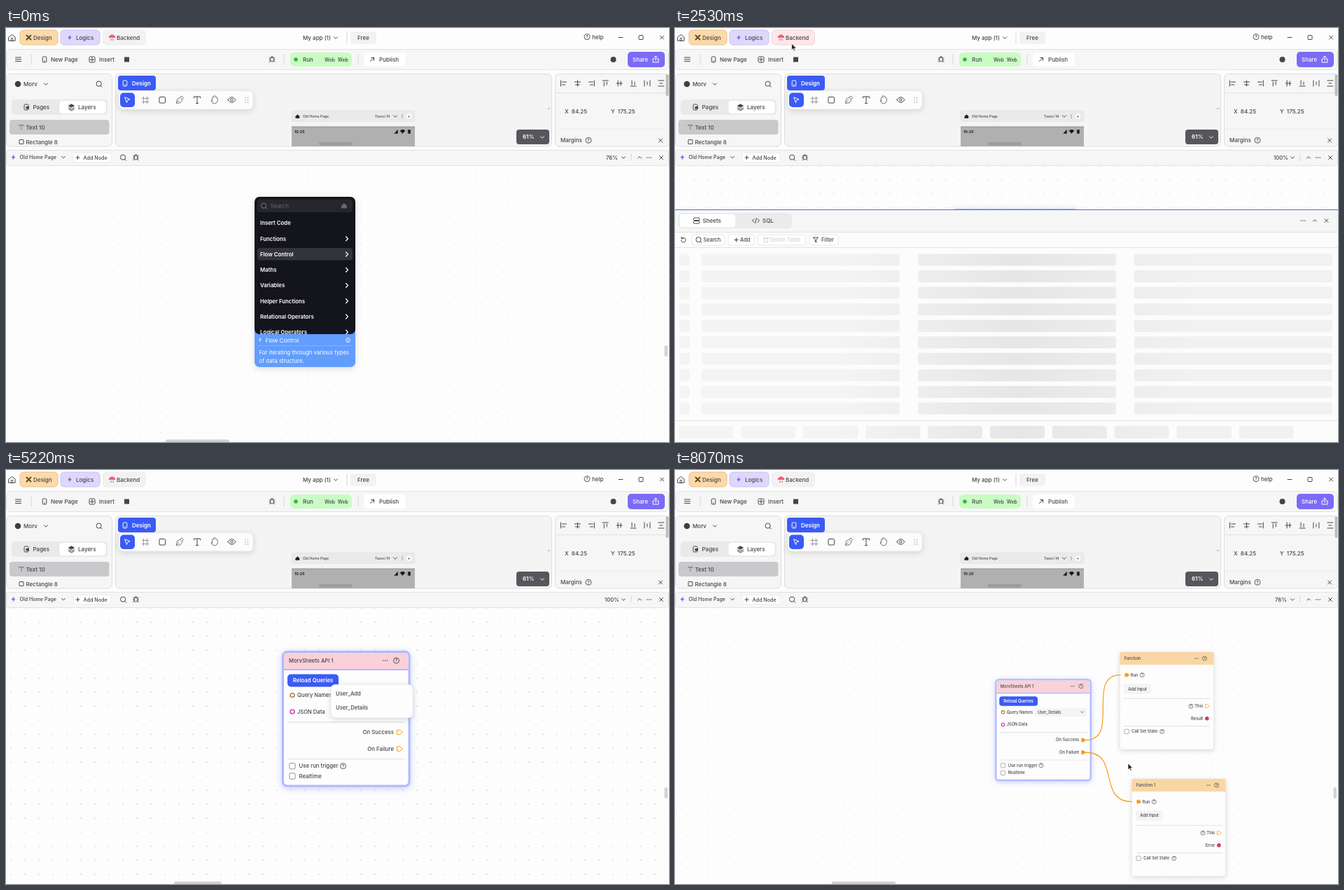
An HTML page for the animation above (8.11 s loop, 947 by 591 pixels).

```html
<!DOCTYPE html>
<html lang="en">
<head>
<meta charset="utf-8">
<title>Node editor</title>
<style>
html, body { margin: 0; width: 100%; height: 100%; overflow: hidden; background: #fdfdfd; }
svg { display: block; width: 947px; height: 591px; font-family: Inter, "Open Sans", sans-serif; }
text { white-space: pre; }
.soft { filter: drop-shadow(0 2px 4px #0002); }
.glow { filter: drop-shadow(0 2px 5px #8090ff70); }
</style>
</head>
<body>
<svg id="stage" viewBox="0 0 947 591"></svg>
<script>
const INK = '#44444c', BLUE = '#3b5bf5', ORANGE = '#f59d1c', EDGE = '#e2e2e0', LILAC = '#b0b9ff';
const LOOP = 8110;

// Drawing helpers, all returning SVG markup
const T = (x, y, s, size = 8, weight = 500, fill = INK, anchor = 'start') =>
  `<text x="${x}" y="${y}" font-size="${size}" font-weight="${weight}" fill="${fill}" text-anchor="${anchor}">${s}</text>`;
const R = (x, y, w, h, r, fill, stroke = 'none', sw = 1, extra = '') =>
  `<rect x="${x}" y="${y}" width="${w}" height="${h}" rx="${r}" fill="${fill}" stroke="${stroke}" stroke-width="${sw}" ${extra}/>`;
const C = (x, y, r, fill, stroke = 'none', sw = 1) =>
  `<circle cx="${x}" cy="${y}" r="${r}" fill="${fill}" stroke="${stroke}" stroke-width="${sw}"/>`;
const P = (d, stroke = INK, w = 1, fill = 'none') =>
  `<path d="${d}" fill="${fill}" stroke="${stroke}" stroke-width="${w}" stroke-linecap="round" stroke-linejoin="round"/>`;
const G = (id, body, extra = '') => `<g id="${id}" ${extra}>${body}</g>`;
const each = (n, draw) => Array.from({ length: n }, (_, i) => draw(i)).join('');

// Icons
const down = (x, y, c = INK) => P(`M${x - 2.5} ${y - 1.2}l2.5 2.5 2.5 -2.5`, c);
const up = (x, y) => P(`M${x - 2.5} ${y + 1.2}l2.5 -2.5 2.5 2.5`);
const cross = (x, y) => P(`M${x - 2.5} ${y - 2.5}l5 5m0 -5l-5 5`);
const plus = (x, y, c = INK) => P(`M${x - 2.5} ${y}h5m-2.5 -2.5v5`, c);
const dots = (x, y) => each(3, i => C(x - 2.8 + i * 2.8, y, .8, INK));
const help = (x, y) => C(x, y, 4, 'none', INK, .9) + T(x, y + 2.3, '?', 6.2, 600, INK, 'middle');
const lens = (x, y, c = INK) => C(x - .4, y - .4, 3.6, 'none', c) + P(`M${x + 2.4} ${y + 2.4}l1.8 1.8`, c);
const bolt = (x, y) => P(`M${x + 1} ${y - 4}l-4 4.8h2.6l-.6 3.2 4 -4.8h-2.6z`, 'none', 0, '#7a62f3');
const bug = (x, y) => R(x - 2.3, y - 2.5, 4.6, 6, 2.2, 'none', INK) +
  P(`M${x - 4} ${y - 2}l1.7 1m4.6 0l1.7 -1m-8 3h1.7m4.6 0h1.7m-8 3l1.7 -1m4.6 0l1.7 1m-5.5 -6v-1.5h3v1.5`, INK, .9);
const house = (x, y, k, c, fill = 'none') =>
  P(`M${x - k} ${y - k * .2}l${k} ${-k * .8}l${k} ${k * .8}v${k * 1.1}h${-k * 2}z`, c, 1, fill);
const phone = (x, y, c) => R(x - 2.8, y - 4, 5.6, 8, 1.3, 'none', c) + P(`M${x - .6} ${y + 2.2}h1.2`, c);
const arrow = (x, y, k = 2.5) => P(`M${x - k} ${y + k}l${2 * k} ${-2 * k}h${-1.5 * k}m${1.5 * k} 0v${1.5 * k}`);
const bar = (x, y, h) => P(`M${x} ${y}v${h}`, '#d6d6d6');
const rule = (y, x = 0, w = 947, c = EDGE) => P(`M${x} ${y}h${w}`, c);
const box = (x, y) => R(x, y, 8.4, 8.4, 2, '#fff', '#77777d', .8);
const pin = (x, y, id, fill) => `<path id="${id}" d="M${x} ${y - 3.2}h4l4 3.2-4 3.2h-4z" fill="${fill}" stroke="${ORANGE}" stroke-linejoin="round"/>`;
const button = (x, w, label, tx, c = INK) =>
  R(x, 295, w, 15, 3, '#fff', '#e8e8e8') + T(tx, 305.3, label, 7.4, 500, c);

function topBar() {
  return R(0, 0, 947, 197, 0, '#fdfdfd') + house(8.5, 14, 4.6, INK) + R(7.3, 14.5, 2.4, 4, 0, 'none', INK, .8) +
    R(20, 3, 54, 21, 5, '#fcd9a8', '#eac38a') + P('M29.5 10.5l6 6m0 -6l-6 6', '#5a4420', 1.8) + T(39, 16.7, 'Design') +
    R(78, 3, 56, 21, 5, '#dfd8fc', '#cbc1f6') + bolt(91, 13.6) + T(100, 16.7, 'Logics') +
    `<rect id="backend" x="138.500" y="3" width="61" height="21" rx="5"/>` +
    P('M147 14a2.5 2.5 0 0 1 2 -3.5a3 3 0 0 1 5 0a2.500 2.500 0 0 1 2 3.500z', 'none', 0, '#ec5f87') + P('M150 15.500v2m3 -2v2', '#ec5f87', 1.2) +
    T(158, 16.7, 'Backend') + T(424, 16.7, 'My app (1)') + down(471, 14) + bar(487, 6, 16) +
    R(492, 5, 37, 18, 4, '#f2f2f2') + T(502, 16.700, 'Free') + help(830, 12.7) + T(837, 15.500, 'help') +
    P('M875 13.500h6') + R(904, 10.500, 6, 6, 1, 'none', INK) + cross(937, 13.500);
}

function actionBar() {
  return R(.5, 30.5, 946, 29, 6, '#f6f6f6', EDGE) + P('M13.500 42h8m-8 2.800h8m-8 2.800h8') + bar(36, 38, 14) +
    phone(55, 45, INK) + T(64, 47.900, 'New Page') + R(119, 41, 8, 8, 1.500, 'none', INK) + plus(123, 45) + T(133, 47.900, 'Insert') +
    R(169, 41.500, 7, 7, 0, INK) + bug(380, 44.500) + bar(397, 38, 14) +
    R(406, 35, 88, 20, 6, '#c9fcc3') + C(414, 45, 2.800, '#3fae52') + T(424, 47.900, 'Run') + T(455, 47.600, 'Web  Web', 7) +
    bar(503, 38, 14) + R(511, 35, 60, 20, 5, '#fff') + arrow(523, 45) + T(533, 47.900, 'Publish') +
    C(867.500, 45, 4, INK) + R(888, 34, 53, 22, 5, '#7b6bf6') + T(895, 47.900, 'Share', 8, 500, '#fff') +
    P('M926 44h-2v5h8v-5h-2m-2 2.500v-6.500m-2 2l2 -2 2 2', '#fff');
}

function layers() {
  return R(.5, 65.5, 151, 103.500, 6, '#f6f6f6', '#dcdcdc') + C(17, 80, 4.300, '#3d3d42') + T(25, 82.800, 'Morv') + down(57, 80) + lens(133, 80) +
    R(8, 102, 137, 22, 5, '#e9e9ea') + R(76, 103.500, 67, 19, 5, '#fff', '#ececec') +
    R(26, 109, 6, 8, 1.500, 'none', INK) + R(28.500, 112, 4.500, 3.500, 0, INK) + T(38.500, 115.900, 'Pages') +
    P('M89.500 111l4 -2.300 4 2.300 -4 2.300z', INK, .8, INK) + P('M89.500 113.700l4 2.300 4 -2.300m-8 2l4 2.300 4 -2.300') + T(103, 115.900, 'Layers') +
    R(5, 131, 142.500, 21, 4, '#c9c8cb') + P('M19 140v-1.500h6v1.500m-3 -1.500v6', '#77777d') + T(28.500, 144.900, 'Text 10') +
    R(19, 159.500, 6, 6, .5, 'none', INK) + T(28.500, 165.600, 'Rectangle 8');
}

function designArea() {
  const gray = '#77777d';
  return R(156.5, 65.5, 623, 103.500, 6, '#f4f4f5', '#dcdcdc') +
    R(161, 89.500, 192, 26.500, 6, '#fcfcfc', '#e8e8e8', 1, 'class="soft"') +
    R(160, 68, 54, 21, 4, BLUE) + phone(170, 79, '#fff') + T(180, 81.900, 'Design', 8, 600, '#fff') +
    R(163, 92.500, 21, 20.500, 5, BLUE) + P('M170 99l7 2.800 -3.200 1.200 -1.200 3.200z', '#fff') +
    P('M196.500 98v10m5 -10v10m-7.500 -7.500h10m-10 5h10', '#9b9ba0') + R(219, 98.500, 8.500, 8.500, 1, 'none', INK) +
    P('M243.500 107l1 -5.500 4 -2.500 3.500 3.500 -2.500 4z m0 0l4 -4m1.500 -4.500l2 -1.500 2.500 2.500 -1.500 2', gray) +
    P('M268.500 100v-2h9v2m-4.500 -2v9.500m-1.500 0h3', INK) +
    P('M294.500 104v-4.500a1 1 0 0 1 2 0v-2a1 1 0 0 1 2 0v1a1 1 0 0 1 2 0v1.500a1 1 0 0 1 1.800 0v4q-1 4 -4.500 4q-3 0 -5 -4.500q1 -1 1.700 .5', gray) +
    P('M317 102.500q5.500 -8 11 0q-5.500 8 -11 0z') + C(322.500, 102.500, 1.700, 'none', INK) +
    each(6, i => C(342 + i % 2 * 3.500, 99.500 + (i >> 1) * 3.200, .8, '#aaa')) +
    R(408, 118, 176, 15.500, 2, '#eaeaeb', '#dedede', .5) + house(416.500, 126.300, 2.300, '#222', '#222') + T(424, 128, 'Old Home Page', 5) +
    T(527, 128, 'Tavori 14', 5) + down(556, 126) + each(3, i => C(566, 124 + i * 2, .6, INK)) + C(575.500, 126, 4, '#fafafa') + T(575.500, 128, '+', 6, 500, INK, 'middle') +
    R(408, 141, 176, 28, 0, '#b0b0b0') + R(408, 140.500, 176, 1, 0, '#8f8f8f') + R(447, 163, 48, 4.500, 2, '#9c9c9c') + T(412, 149.500, '10:25', 5.400, 700, '#222') +
    P('M555 150.500h4.500v-5zM563 146.500q3.500 -2.500 7 0l-3.500 4zM574.500 145.500h3v5h-3z', '#222', .5, '#111') + P('M774 115h3', '#aaa') +
    R(729, 145, 47, 21, 4, '#56575c') + T(738, 158.300, '61%', 8, 600, '#fff') + down(766, 156, '#fff');
}

function inspector() {
  const align = [
    'M-4 -4v8M-2 -2h6M-2 2h4', 'M0 -4v8M-4 -2h8M-3 2h6', 'M4 -4v8M2 -2h-6M2 2h-4', 'M-4 -4h8M-2 -2v6M2 -2v4',
    'M-4 0h8M-2 -4v8M2 -3v6', 'M-4 4h8M-2 2v-6M2 2v-4', 'M-4 -4v8M4 -4v8M0 -2v4', 'M-4 -4h8M-4 4h8M-2 0h4'];
  return R(784.5, 65.5, 163, 103.500, 6, '#f6f6f6', '#dcdcdc') + rule(92.500, 785, 158) +
    align.map((d, i) => `<g transform="translate(${796.500 + i * 19.900} 79)">${P(d)}</g>`).join('') +
    T(798, 122, 'X  84.25') + T(864, 122, 'Y  175.25') + rule(144, 785, 158, '#ececec') +
    T(792, 163.300, 'Margins') + help(832, 160.300) + cross(935, 160.500) + R(942.500, 66, 4, 31, 2, '#bdbdbd');
}

function logicBar() {
  return R(.5, 174.5, 946, 22, 4, '#f6f6f6', EDGE) + bolt(10.500, 184.500) + T(19.500, 187, 'Old Home Page', 7.100) + down(82, 184.500) +
    R(96, 178.500, 54, 13, 3, '#fff', '#ededed') + plus(102.500, 185) + T(110.500, 187.800, 'Add Node', 7.200) + lens(167.500, 185) + bug(185.500, 184.500) +
    `<text id="zoom" x="865.5" y="187.8" font-size="7.8" font-weight="500" fill="${INK}" text-anchor="middle"></text>` +
    down(882, 185) + bar(893, 180, 9) + up(905, 184.800) + dots(918.500, 185) + cross(936, 185);
}

function apiNode() {
  return G('api', R(395.500, 259.500, 180.500, 191.500, 6, '#fdfdfd', LILAC, 3, 'class="glow"') +
    P('M397 284v-19q0 -4 4 -4h169.500q4 0 4 4v19z', 'none', 0, '#fad1d8') + P('M397 285h177.500', LILAC, 2) +
    T(404, 274.600, 'MorvSheets API 1', 7.600) + dots(541.700, 272) + help(557.500, 272) +
    R(402, 291.500, 73, 18, 5, BLUE) + T(438.500, 303.300, 'Reload Queries', 7.800, 600, '#fff', 'middle') +
    C(409, 321.500, 2.900, '#fff', '#a2731c', 1.400) + T(416, 324.200, 'Query Names', 7.600) +
    G('select', R(470, 313.500, 98, 16, 3, '#f4f4f5') + G('chosen', T(475, 324.200, 'User_Details', 7.400)) + down(560, 321.300)) +
    C(409, 345, 2.900, '#fff', '#d21fbf', 1.400) + T(416, 347.700, 'JSON Data', 7.600) + rule(360, 402, 167, '#d8d6d2') +
    T(554, 377, 'On Success', 7.800, 500, INK, 'end') + pin(558.500, 374.500, 'successPin', '#fff') +
    T(554, 400.500, 'On Failure', 7.800, 500, INK, 'end') + pin(558.500, 398, 'failurePin', '#fff') + rule(412.500, 402, 167, '#e6dfcc') +
    box(404.800, 418.500) + T(418.500, 425.400, 'Use run trigger', 7.800) + help(481.500, 422.700) + box(404.800, 432.800) + T(418.500, 439.700, 'Realtime', 7.800));
}

function functionNode(id, title, result, dx, dy) {
  return G(id, R(631.500, 207.500, 179, 185, 4, '#fdfdfd', '#e6e6e8', 1, 'class="soft"') +
    P('M631.500 231v-20q0 -4 4 -4h171q4 0 4 4v20z', 'none', 0, '#fad6a5') + T(640, 221.800, title, 7.600) + dots(777.500, 219) + help(793, 219) +
    pin(641.500, 250.500, id + 'Pin', ORANGE) + T(652, 253.400, 'Run', 7.600) + help(674, 250.700) +
    R(639, 267, 52, 20, 4, '#f4f4f5') + T(665, 279.800, 'Add Input', 7.700, 500, INK, 'middle') + rule(295.500, 639, 164, '#d8d8d8') +
    help(767, 310) + T(790, 312.800, 'This', 7.800, 500, INK, 'end') + pin(794, 310, id + 'This', '#fff') +
    T(790, 336.200, result, 7.800, 500, INK, 'end') + C(797.500, 333.500, 2.900, '#f3406c', '#c71f4d', 1.400) + rule(348, 639, 164, '#d8d8d8') +
    box(640.300, 354) + T(654, 360.900, 'Call Set State', 7.700) + help(712, 358.200), `transform="translate(${dx} ${dy})"`);
}

const ITEMS = ['Insert Code', 'Functions', 'Flow Control', 'Maths', 'Variables', 'Helper Functions', 'Relational Operators', 'Logical Operators'];
function menu() {
  return G('menu', R(355, 400, 144, 84, 7, '#629dfd') + R(355, 241, 144, 196, 7, '#14141c') +
    R(359, 244.500, 136, 18.500, 4, '#26262e') + lens(368.500, 254, '#77777d') + T(377.500, 256.700, 'Search', 8, 400, '#66666d') + house(483, 254, 3.200, '#66666d', '#66666d') +
    '<g clip-path="url(#listClip)"><g id="list">' + R(359, 314, 136, 17.500, 4, '#33333b', 'none', 1, 'id="hover"') +
    ITEMS.map((s, i) => T(363, 281.300 + i * 22.250, s, 7.800, 600, '#fff') +
      (i ? P(`M485.500 ${275.500 + i * 22.250}l3 3 -3 3`, '#fff', 1.200) : '')).join('') + '</g></g>' +
    T(361.500, 447.500, 'F', 6.500, 600, '#fff') + `<text id="hint" x="370.5" y="448.600" font-size="8" fill="#fff"></text>` +
    C(488.500, 445.700, 3, 'none', '#fff', .9) + P('M488.500 445.500v1.500m0 -3v.1', '#fff', .9) + rule(453.500, 361, 132, '#7fb0ff') +
    T(361.500, 466.300, 'For iterating through various types', 7.900, 400, '#fff') + T(361.500, 477.700, 'of data structure.', 7.900, 400, '#fff'), 'class="soft"');
}

function sheetsTab() {
  const bone = (x, y, w, h) => R(x, y, w, h, 3, 'url(#shimmer)');
  return G('sheets', R(6, 265, 81, 20, 5, '#fff', '#e4e4e4') + button(118, 69, 'Delete Table', 135, '#d2d2d4') + P('M127.500 300h5l-.5 6h-4zm-1 0h7', '#d2d2d4') +
    button(192, 41, 'Filter', 209) + P('M197.500 299h7l-2.700 3.300v3.700l-1.600 -1v-2.700z') +
    each(10, i => [[6, 15], [38, 283], [347, 283], [656, 283]].map(([x, w]) => bone(x, 322.500 + i * 23.550, w, 17)).join('')) +
    rule(560.5) + each(10, i => bone(5.500 + i * 88.900, 568, 78, 18)));
}

function sqlTab() {
  const row = (y, name, text, date) => box(10.800, y - 4.200) + T(42.500, y + 2.800, name, 7.800, 600, '#2f52d8') + arrow(180, y, 2.200) +
    T(216.500, y + 2.800, text, 7.700) + T(390, y + 2.800, date, 7.700);
  return G('sql', R(85.500, 265, 81, 20, 5, '#fff', '#e4e4e4') + button(118, 69, 'Delete Query', 134, '#d2d2d4') + P('M126.500 300h5l-.5 6h-4zm-1 0h7', '#d2d2d4') +
    button(192, 38, 'Edit', 208, '#d2d2d4') + P('M199 305l.5 -2 3.500 -3.500 1.500 1.500 -3.500 3.500z', '#d2d2d4') + button(235, 40, 'Filter', 252) + P('M241 299h7l-2.700 3.300v3.700l-1.600 -1v-2.700z') +
    G('picked', R(0, 357, 547, 19, 0, '#e9ecfa')) + [336.500, 356.500, 376].map(y => rule(y, 0, 547, '#d9d9de')).join('') +
    [29, 203, 377].map(x => bar(x, 314, 62)).join('') + box(10.800, 321) + T(42.500, 328.300, 'Function Name', 7.800) +
    P('M217.500 322h8m-8 2.500h8m-8 2.500h5') + T(232, 328, 'Description', 7.800) + P('M391.500 329l.7 -2.500 5 -5 1.700 1.700 -5 5zm4 0h4') + T(405, 328, 'Last Modified', 7.800) +
    row(346.700, 'User_Add', 'adding details', 'March 27, 2024 • 5:41 AM') + row(366, 'User_Details', 'it will give the user details', 'March 27, 2024 • 5:40 AM') +
    P('M547.500 314v277', '#8b8b90') +
    G('editor', T(558, 329.800, 'User_Details', 7.700, 600, '#2f52d8') + R(798.500, 319.500, 72, 15.500, 4, '#c9fcc3') + P('M805.500 324.500l4.500 2.700 -4.500 2.700z', INK, .8, INK) +
      T(813, 330, 'Run SQL', 7.700) + P('M853.500 320v14.500', '#a6e6a4') + down(861.500, 327) + R(878, 320, 61, 15.500, 4, '#fff') + T(886, 330.500, 'Save SQL', 7.500) +
      R(925, 323.500, 8, 8, 1, INK) + R(927, 324.500, 4, 2, 0, '#fff') + R(927, 328.500, 4, 3, 0, '#fff') + rule(341, 548, 399) + bar(580.500, 341, 250) + T(558.500, 361.500, '1', 7.500) +
      '<text x="588" y="363.700" font-size="8.400" font-weight="600" fill="#8e1b91" font-family="Noto Sans Mono, DejaVu Sans Mono, monospace">Select * from users</text>'));
}

function backendPanel() {
  const tabs = T(39.500, 277.800, 'Sheets') + R(26.500, 271, 8.500, 3.500, 1, 'none', INK) + R(26.500, 275.500, 8.500, 3.500, 1, 'none', INK) +
    T(125, 277.800, 'SQL') + P('M113 272.500l-2.500 2.500 2.500 2.500m5 -5l2.500 2.500 -2.500 2.500m-1.700 -6l-1.600 7');
  return G('panel', R(0, 259.500, 947, 332, 0, '#fcfcfc') + R(0, 260, 947, 31.500, 0, '#f6f6f6') + rule(291.500) + rule(313.500) +
    '<path id="panelEdge" d="M0 259.5h947"/>' + R(5, 264, 162, 22, 5, '#ebebeb') + dots(897, 275) + up(914, 275) + cross(930.500, 275) +
    P('M9.500 300.500a3.300 3.300 0 1 1 -.8 2.500m.3 -4.500l.3 2.300 2.300 -.3') + button(24, 47, 'Search', 40.500) + lens(34, 302.500) + button(76, 37, 'Add', 93) + plus(87.500, 302.500) +
    sheetsTab() + sqlTab() + tabs);
}

stage.innerHTML = `<defs>
  <pattern id="grid" width="20" height="20" patternUnits="userSpaceOnUse"><circle cx="7" cy="17" r=".9" fill="#dcdce6"/></pattern>
  <linearGradient id="shimmer" gradientUnits="userSpaceOnUse" x1="0" x2="500">
    <stop offset="0" stop-color="#f4f4f5"/><stop offset=".5" stop-color="#e6e6e8"/><stop offset="1" stop-color="#f1f1f2"/></linearGradient>
  <clipPath id="listClip"><rect x="355" y="264" width="144" height="173"/></clipPath></defs>` +
  R(0, 197, 947, 394, 0, '#fdfdfd') + R(0, 197, 947, 394, 0, 'url(#grid)') +
  G('world', functionNode('first', 'Function', 'Result', 0, 0) + functionNode('second', 'Function 1', 'Error', 22.700, 241.300) + apiNode() +
    ['wireA', 'wireB'].map(id => `<path id="${id}" fill="none" stroke="${ORANGE}" stroke-width="1.600"/>`).join('')) +
  G('popup', R(464, 306.500, 117, 47, 6, '#fdfdfd', '#eee', 1, 'class="soft"') + T(471, 321.500, 'User_Add', 7.700) + T(471, 342.300, 'User_Details', 7.700)) +
  menu() + R(940.500, 453, 4.500, 16, 2, '#d3d3d5') + R(228, 587.5, 91, 4, 2, '#cfcfcf', 'none', 1, 'id="scroll"') +
  backendPanel() + topBar() + actionBar() + layers() + designArea() + inspector() + logicBar() +
  G('cursor', G('pointer', P('M0 0v9l2.200 -2 1.600 3.400 1.500 -.7 -1.600 -3.300h3z', '#fff', .7, '#222')) +
    G('mover', P('M-4.500 0h9m-4.500 -4.500v9m-1.500 -7.500l1.500 -1.500 1.500 1.500m-3 6l1.500 1.500 1.500 -1.500m-4.500 -4.500l-1.500 1.500 1.500 1.500m6 -3l1.500 1.500 -1.500 1.500', '#333', 1.100)));

// Pointer route: time, x, y
const ROUTE = [
  [0, 430, 323], [250, 430, 323], [520, 430, 422], [620, 430, 422], [850, 505, 283], [1700, 505, 283], [2250, 168, 14], [2450, 168, 14],
  [3200, 126, 275], [3400, 126, 275], [3600, 70, 366], [4000, 200, 366], [4350, 931, 275], [4500, 931, 275], [4800, 438, 300], [4920, 438, 300],
  [5040, 520, 321], [5300, 520, 321], [5500, 493, 340], [5600, 493, 340], [5880, 562, 374.500], [5950, 562, 374.500], [6250, 631, 250.500],
  [6430, 680, 266], [6560, 680, 266], [6930, 559, 405], [6990, 559, 405], [7060, 562, 398], [7120, 562, 398], [7350, 654, 492],
  [7500, 700, 400], [7600, 700, 400], [7690, 647, 419], [LOOP, 647, 419]];
const HIDDEN = [[0, 120], [2750, 3050], [3700, 3950], [5120, 5350]];

const el = id => document.getElementById(id);
const show = (id, on) => el(id).setAttribute('display', on ? 'inline' : 'none');
const set = (id, attrs) => Object.entries(attrs).forEach(([k, v]) => el(id).setAttribute(k, v));
const within = (t, a, b) => t >= a && t < b;
const ease = (t, a, b) => { const u = Math.min(1, Math.max(0, (t - a) / (b - a))); return u * u * (3 - 2 * u); };

function pointerAt(t) {
  const i = ROUTE.findIndex(k => k[0] > t), [a, x, y] = ROUTE[i - 1], [b, X, Y] = ROUTE[i], u = ease(t, a, b);
  return [x + (X - x) * u, y + (Y - y) * u];
}

function wire(id, t, from, drop, y, end, cursor) {
  show(id, t >= from);
  const [x, endY] = t < drop ? cursor : end, pull = Math.min(68, Math.abs(x - 566) + 4);
  set(id, { d: `M566 ${y}C${566 + pull} ${y} ${x - pull} ${endY} ${x} ${endY}` });
}

function draw(t) {
  const cursor = pointerAt(t), [x, y] = cursor, late = t > 4000;
  const out = late ? ease(t, 7700, 7980) : 1 - ease(t, 950, 1350);
  const zoom = 1 - out / 4, [ax, ay] = late ? [647, 418.700] : [505, 283];
  const view = `translate(${ax * (1 - zoom)} ${ay * (1 - zoom)}) scale(${zoom})`;
  set('world', { transform: view });
  set('grid', { patternTransform: view });
  el('zoom').textContent = Math.round(100 - 24 * out) + '%';
  set('scroll', { x: 240 - (late ? 16 : 12) * out, width: 68 + 23 * out });

  const panel = within(t, 2400, 4500), sql = t >= 3330;
  show('panel', panel);
  show('sheets', !sql);
  show('sql', sql);
  show('picked', t >= 3600);
  show('editor', t >= 3600);
  set('panelEdge', { stroke: sql ? '#dcdcdc' : '#4f6bd6', 'stroke-width': 1.2 });
  set('shimmer', { gradientTransform: `translate(${560 + (t - 2890) * .9} 0)` });
  set('backend', panel ? { fill: '#fde7eb', stroke: '#f5d3da' } : { fill: '#f3f2f2', stroke: '#f0efef' });

  show('api', t >= 620);
  show('select', t >= 4920);
  show('chosen', t >= 5600);
  show('popup', within(t, 5080, 5600));
  show('first', t >= 6560);
  show('second', t >= 7600);
  wire('wireA', t, 5950, 6250, 374.500, [633, 250.500], cursor);
  wire('wireB', t, 7120, 7350, 398, [655, 492], cursor);
  set('successPin', { fill: t >= 5950 ? ORANGE : '#fff' });
  set('failurePin', { fill: t >= 7120 ? ORANGE : '#fff' });

  const again = t > 7000, scroll = t < 1000 ? 12 * ease(t, 250, 520) : 0;
  const [mx, my] = t < 1000 ? [0, 0] : again ? [299, 100] : [276, -35];
  const row = t < 1000 ? Math.min(7, Math.max(2, Math.round((y + scroll - 278.500) / 22.250))) : 1;
  show('menu', t < 620 || within(t, 6260, 6560) || within(t, 7360, 7600));
  set('menu', { transform: `translate(${mx} ${my})` });
  set('list', { transform: `translate(0 ${-scroll})` });
  set('hover', { y: 269.500 + row * 22.250 });
  el('hint').textContent = ITEMS[row];

  const onNode = t > 620 && !panel && !within(t, 5080, 5600) && x > 395 && x < 577 && y > 259 && y < 451;
  show('cursor', !HIDDEN.some(([a, b]) => within(t, a, b)));
  show('mover', onNode);
  show('pointer', !onNode);
  set('cursor', { transform: `translate(${x} ${y})` });
}

const start = performance.now();
function tick() {
  draw((performance.now() - start) % LOOP);
  requestAnimationFrame(tick);
}
tick();
</script>
</body>
</html>
```
